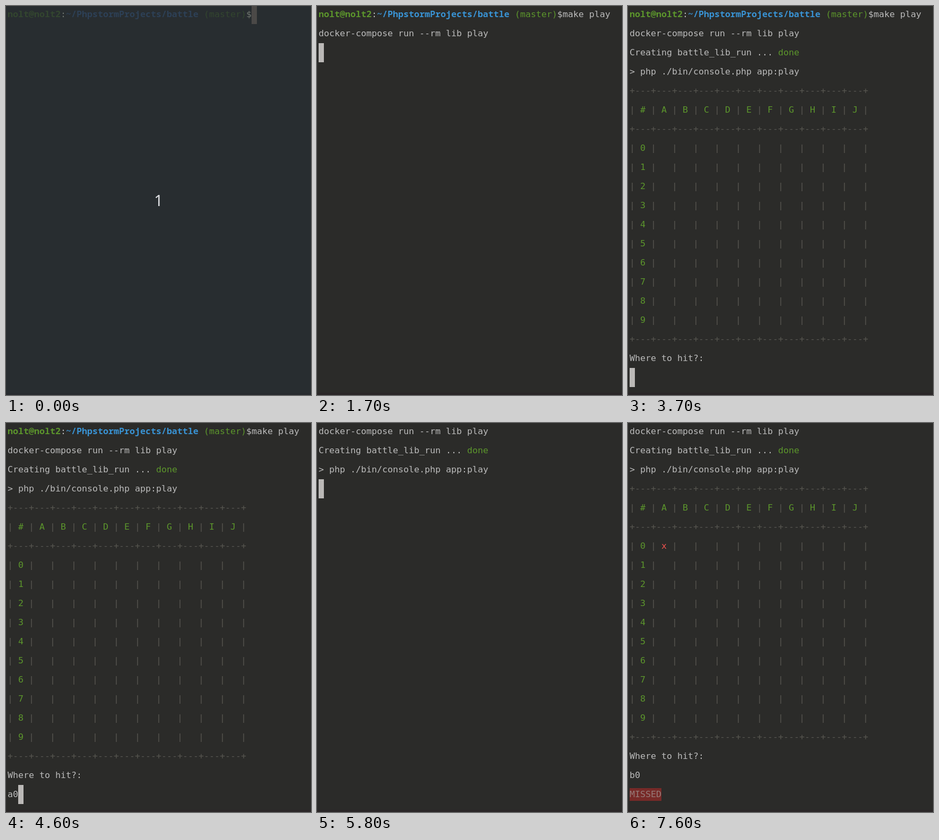
Animation of 575 by 733 pixels, one loop 8 s. Source, as an HTML page with a canvas:

```html
<!DOCTYPE html>
<html lang="en">
<head>
<meta charset="utf-8">
<title>Terminal game</title>
<style>
  html, body { margin: 0; height: 100%; overflow: hidden; background: #2b2b29; }
  canvas { display: block; }
</style>
</head>
<body>
<canvas id="stage" width="575" height="733"></canvas>
<script>
const ctx = document.getElementById('stage').getContext('2d', { alpha: false });
const LOOP = 8000, CELL = 10, ROW = 36, LEFT = 3, BASELINE = 21;
// Both sizes give an advance of one cell.
const REGULAR = '16.61px "DejaVu Sans Mono", monospace';
const BOLD = 'bold 16.667px "Noto Sans Mono", monospace';

const normal = {
  back: '#2b2b29', strip: '#2a2627', text: '#bbbbbb', cursor: '#bbb9b7',
  green: '#5c962c', blue: '#3993d4', red: '#f0524f', border: '#575650',
  alert: '#772a28', alertText: '#967c7a'
};
const dimmed = {
  ...normal, back: '#282d30', strip: '#272a2e', text: '#70766f',
  cursor: '#4b4947', green: '#33462f', blue: '#2d4056'
};

// A line is a list of text pieces placed on the character grid.
const piece = (col, text, color = 'text', bold = false) => ({ col, text, color, bold });

const prompt = command => [
  piece(0, 'nolt@nolt2', 'green', true),
  piece(10, ':'),
  piece(11, '~/PhpstormProjects/battle', 'blue', true),
  piece(37, '(master)', 'green'),
  piece(45, '$' + command)
];
const plain = text => [piece(0, text)];
const compose = plain('docker-compose run --rm lib play');
const creating = [piece(0, 'Creating battle_lib_run ...'), piece(28, 'done', 'green')];
const php = plain('> php ./bin/console.php app:play');
const missed = [{ ...piece(0, 'MISSED', 'alertText'), back: 'alert' }];
const intro = [compose, creating, php];

function board(mark) {
  const rule = [piece(0, '+---'.repeat(11) + '+', 'border')];
  const row = labels => [
    piece(0, '|   '.repeat(11) + '|', 'border'),
    ...[...labels].map((label, i) => piece(4 * i + 2, label, 'green'))
  ];
  const rows = [...'0123456789'].map(row);
  if (mark) rows[0].push(piece(6, mark, 'red'));
  return [rule, row('#ABCDEFGHIJ'), rule, ...rows, rule, plain('Where to hit?:')];
}

const started = [prompt('make play'), ...intro];
const firstTurn = [...started, ...board()];
const firstShot = [...intro, ...board(), plain('a0'), missed];
const secondTurn = [...intro, ...board('x')];
const secondShot = [...secondTurn, plain('b0'), missed];

// Each scene: start time, lines, then cursor row and column (absent while hidden).
const scenes = [
  [0, [prompt('')], 0, 46],
  [300, [prompt('')]],
  [700, [prompt('')], 0, 46],
  [800, [prompt('clear')], 0, 51],
  [1000, [prompt('make play')], 0, 55],
  [1500, [prompt('make play')]],
  [1700, started.slice(0, 2), 2, 0],
  [2100, started.slice(0, 3), 3, 0],
  [2700, started, 4, 0],
  [2800, started, 5, 0],
  [3200, started],
  [3600, started, 4, 0],
  [3700, firstTurn, 19, 0],
  [4500, [...firstTurn, plain('a')], 19, 1],
  [4600, [...firstTurn, plain('a0')], 19, 2],
  [4800, firstShot, 20, 0],
  [5300, firstShot],
  [5800, intro, 3, 0],
  [5900, secondTurn, 18, 0],
  [6800, [...secondTurn, plain('b')], 18, 1],
  [6900, [...secondTurn, plain('b0')], 18, 2],
  [7100, secondShot, 20, 0],
  [7600, secondShot]
];

function fill(color, x, y, width, height) {
  ctx.fillStyle = color;
  ctx.fillRect(x, y, width, height);
}

function draw(time) {
  const countdown = time < 100;
  const colors = countdown ? dimmed : normal;
  const [, lines, cursorRow, cursorCol] = scenes.findLast(scene => scene[0] <= time);

  fill(colors.back, 0, 0, 575, 733);
  fill(colors.strip, 0, 729, 575, 4);
  if (cursorRow !== undefined) {
    fill(colors.cursor, LEFT + cursorCol * CELL, cursorRow * ROW - 2, CELL, ROW);
  }

  ctx.textAlign = 'left';
  lines.forEach((line, row) => {
    for (const { col, text, color, bold, back } of line) {
      const x = LEFT + col * CELL;
      if (back) fill(colors[back], x, row * ROW + 4, text.length * CELL, 24);
      ctx.font = bold ? BOLD : REGULAR;
      ctx.fillStyle = colors[color];
      ctx.fillText(text, x, row * ROW + BASELINE);
    }
  });

  if (countdown) {
    ctx.font = '29px "Noto Sans", sans-serif';
    ctx.textAlign = 'center';
    ctx.fillStyle = '#dfe0e3';
    ctx.fillText('1', 287.5, 377);
  }
}

const start = performance.now();
function tick() {
  draw((performance.now() - start) % LOOP);
  requestAnimationFrame(tick);
}
tick();
</script>
</body>
</html>
```
